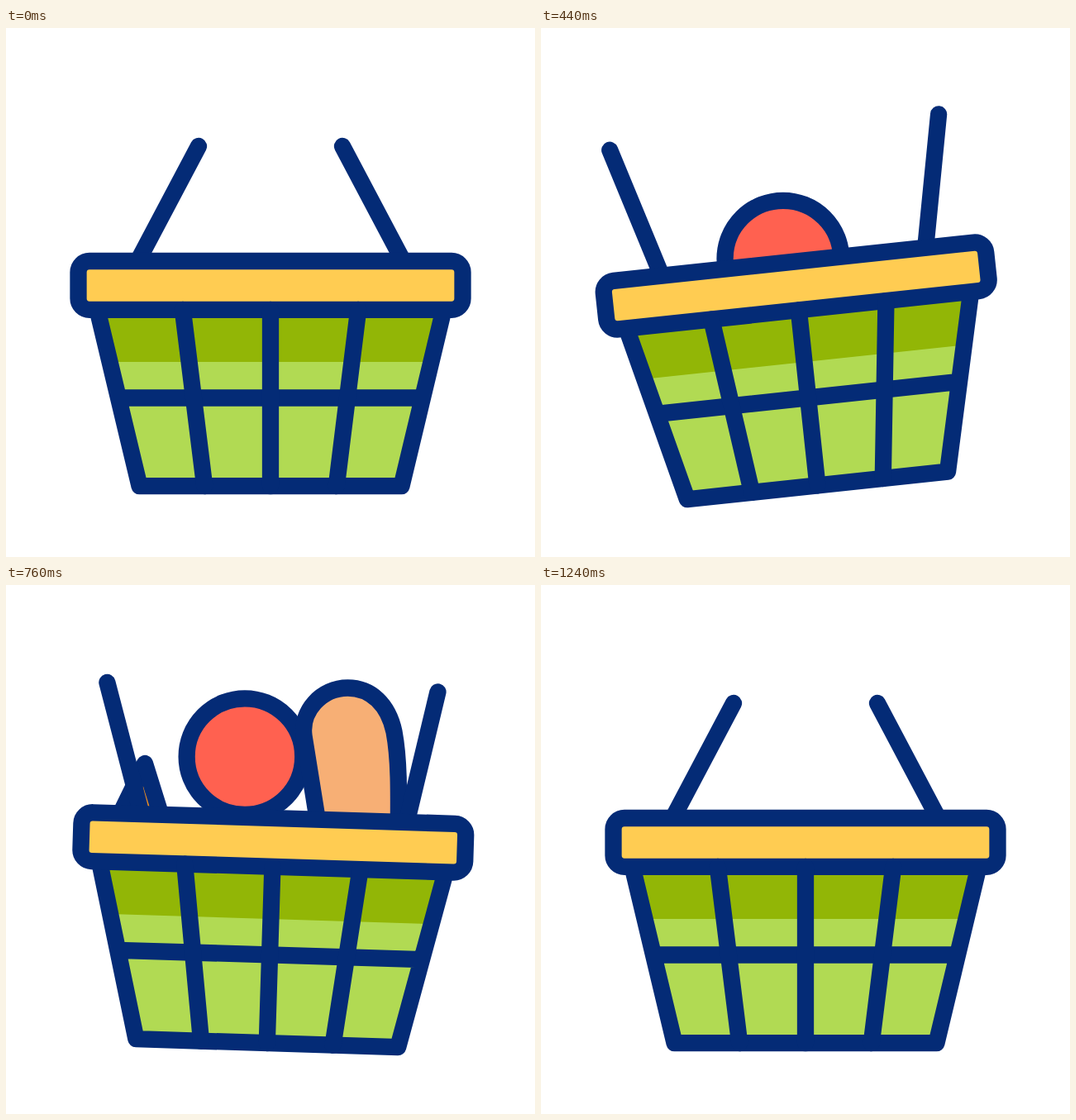
Animation, 640 px wide and 640 px high, one loop 2000 ms. Source, as an HTML page:

```html
<!DOCTYPE html>
<html lang="en">
<head>
<meta charset="utf-8">
<title>Shopping basket</title>
<style>
  html, body { margin: 0; width: 100%; height: 100%; overflow: hidden; background: #fff; }
  svg { display: block; width: 100%; height: 100%; }
  .line { stroke: #042b76; stroke-width: 20.3; stroke-linecap: round; stroke-linejoin: round; }
</style>
</head>
<body>
<svg viewBox="0 0 640 640">
  <defs>
    <clipPath id="above"><rect id="mask" x="-200" y="-300" width="1040" height="611"/></clipPath>
  </defs>
  <g class="line" clip-path="url(#above)">
    <path id="wedge" fill="#f7931e" d="M-41.5 85 L0 0 L26.5 85"/>
    <circle id="tomato" r="70.3" fill="#ff6150"/>
    <path id="bread" fill="#f7af75"
      d="M-31 195 L-53 58 C-57 28 -32 0 0 0 C28 0 49 20 56 53 C62 85 62 120 61 195"/>
  </g>
  <g id="basket" class="line" fill="none">
    <path id="handles"/>
    <path stroke="none" fill="#b1da53" d="M110.5 341 L161.5 554 H478.5 L529.5 341 Z"/>
    <path stroke="none" fill="#92b606" d="M110.5 341 L125.6 404 H514.4 L529.5 341 Z"/>
    <path d="M110.5 341 L161.5 554.2 H478.5 L529.5 341 M136 447.5 H504"/>
    <rect x="87.5" y="282" width="465" height="58.8" rx="13.5" fill="#ffcc52"/>
    <path id="ribs"/>
  </g>
</svg>
<script>
const LOOP = 2000, MID = 320, RISE = 340;
const el = id => document.getElementById(id);
const mix = (a, b, k) => a + (b - a) * k;

// Smooth 0..1 progress between two times
function ease(t, from, to) {
  const u = Math.min(1, Math.max(0, (t - from) / (to - from)));
  return u * u * (3 - 2 * u);
}

// Each item climbs by `depth` to its top point, sliding by `slide`, then sinks back
const items = {
  tomato: { x: 289, top: 197.5, depth: 190, slide: -9, up: 255, down: 683, end: 1240 },
  bread: { x: 413.5, top: 124.5, depth: 190, slide: 41, up: 405, down: 760, end: 1140 },
  wedge: { x: 168, top: 212.5, depth: 97, slide: 0, up: 460, down: 830, end: 1233 }
};

function place(id, t) {
  const m = items[id];
  const below = 1 - ease(t, m.up, m.up + RISE);
  const sunk = ease(t, m.down, m.end);
  const x = m.x - m.slide * below + m.slide * sunk * 0.15;
  const y = m.top + m.depth * (below + sunk);
  el(id).setAttribute('transform', `translate(${x} ${y})`);
}

// One handle swings from leaning inwards to leaning outwards
function handle(side, openX, openY, k) {
  const tip = MID + side * mix(87, openX, k);
  return `M${MID + side * 160.5} 282 L${tip} ${mix(143, openY, k)}`;
}

function draw(t) {
  const angle = -17 * ease(t, 0, 300) + 24 * ease(t, 300, 600) - 7 * ease(t, 600, 840);
  const turn = `rotate(${angle} ${MID} 418)`;
  el('basket').setAttribute('transform', turn);
  el('mask').setAttribute('transform', turn);

  const open = ease(t, 67, 310) - ease(t, 767, 1233);
  el('handles').setAttribute('d', handle(-1, 206.8, 124.2, open) + handle(1, 193.4, 123.2, open));

  for (const id in items) place(id, t);
}

el('ribs').setAttribute('d', [-1, 0, 1].map(side =>
  `M${MID + side * 106.2} 341 L${MID + side * 79.8} 554.2`).join(''));

const start = performance.now();
function tick() {
  draw((performance.now() - start) % LOOP);
  requestAnimationFrame(tick);
}
draw(0);
requestAnimationFrame(tick);
</script>
</body>
</html>
```
